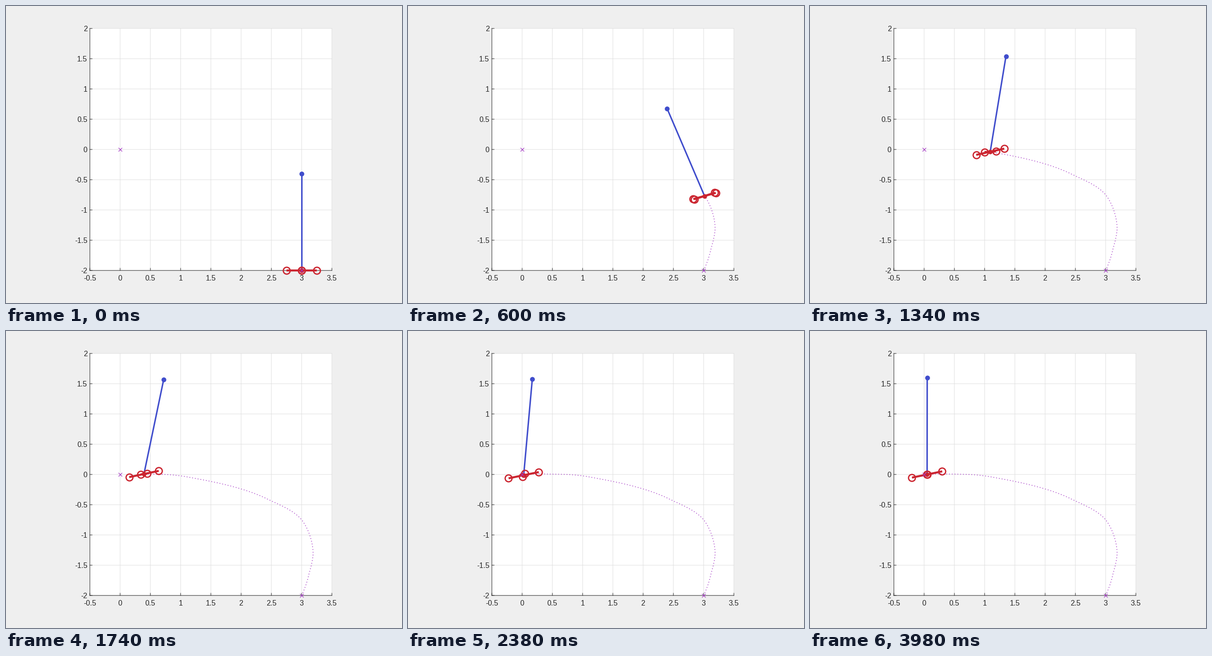
Animation of 864x648 px, one loop 4 s. Source, as a matplotlib script:

```python
import numpy as np
import matplotlib.pyplot as plt
from matplotlib.animation import FuncAnimation

W, H, DPI = 864, 648, 100
FRAMES, STEP = 200, 20
PX = 72 / DPI
UNIT, X0, Y0 = 132, 249, 313
ARM, ROD = 33, 211.5
BLUE, RED, PURPLE = "#404dcc", "#cb2530", "#a235c4"
INK, GRID = "#262626", "#dfdfdf"

plt.rcParams["font.family"] = "Liberation Sans"
fig = plt.figure(figsize=(W / DPI, H / DPI), dpi=DPI, facecolor="#efefef")
ax = fig.add_axes([0, 0, 1, 1])
ax.set(xlim=(0, W), ylim=(H, 0))
ax.axis("off")

t = np.arange(FRAMES) * STEP / 1000


def spline(keys, values):
    """Cubic through a few key values, starting at rest."""
    slope = np.gradient(values, keys)
    slope[0] = 0
    k = np.searchsorted(keys, t, side="right") - 1
    h = keys[k + 1] - keys[k]
    u = (t - keys[k]) / h
    rise = values[k + 1] - values[k]
    return (values[k] + u * u * (3 - 2 * u) * rise
            + u * (1 - u) * h * ((1 - u) * slope[k] - u * slope[k + 1]))


def pulse(peak, sharp):
    """Rises from 0 to 1 at the peak time, then dies away."""
    r = t / peak
    return r ** sharp * np.exp(sharp * (1 - r))


# Flight path of the body: time, x, y
keys = np.array([
    (0, 645, 577), (.25, 660, 534.5), (.4, 670, 483), (.6, 647, 414.5),
    (.85, 569, 366), (1.34, 393.2, 318), (1.74, 301, 312), (2.38, 252.4, 314.6),
    (2.7, 246.5, 315), (3, 250.2, 314), (4, 255.6, 313)])
x, y = (spline(keys[:, 0], col) for col in keys.T[1:])

# The pendulum lags behind, swings past the body and settles upright
lean = 47.6 * pulse(1.54, 8.4) - 86 * pulse(.55, 4)
depth = 40 * pulse(.6, 4) + 20 * pulse(2.05, 20)
tip_x = x + lean
tip_y = y - np.sqrt(ROD ** 2 - lean ** 2 - depth ** 2)

# Two crossed rotor arms: yaw shortens one and opens the other
yaw = np.radians(42) * pulse(.6, 1.5)
pitch = 6.8 * (1 - np.exp(-(t / .3) ** 3))
roll = 7 * pulse(.6, 6) + 3.5 * pulse(2.4, 30)
spans = [(ARM * np.cos(yaw), -pitch), (ARM * np.sin(yaw), -roll)]


def line(xs, ys, color, width, **kw):
    return ax.plot(xs, ys, color=color, lw=width * PX, **kw)[0]


def rule(xs, ys, color):
    line(xs, ys, color, 1, snap=False)


def label(px, py, value, ha):
    ax.text(px, py, f"{value:g}", ha=ha, va="baseline", size=16 * PX, color=INK)


left, right, top, bottom = 183, 711, 49, 577
ticks = [(left + 66 * n, bottom - 66 * n, n / 2) for n in range(9)]
ax.fill([left, right, right, left], [top, top, bottom, bottom], color="white", lw=0)
for gx, gy, _ in ticks:
    rule([gx, gx], [top, bottom], GRID)
    rule([left, right], [gy, gy], GRID)
for gx, gy, value in ticks:
    rule([gx, gx], [bottom, bottom - 5], INK)
    rule([left, left + 5], [gy, gy], INK)
    label(gx, 599, value - .5, "center")
    label(177.5, gy + 5.6, value - 2, "right")
rule([left, left], [top, bottom], INK)
rule([left, right], [bottom, bottom], INK)

trail = line([], [], PURPLE, 1.6, ls=(0, (1, 2.8)), dash_capstyle="butt")
rod = line([], [], BLUE, 3.2, solid_capstyle="butt")
tip = line([], [], BLUE, 0, marker="o", ms=10.5 * PX, mew=0)
hub = line([], [], RED, 0, marker="o", ms=10 * PX, mew=0)
arms = [line([], [], RED, 4.4, solid_capstyle="butt", marker="o", ms=15 * PX,
             mfc="none", mew=2.8 * PX) for _ in spans]
line([X0, X0 + 3 * UNIT], [Y0, Y0 + 2 * UNIT], PURPLE, 0, marker="x",
     ms=8 * PX, mew=1.2 * PX, zorder=4)


def update(i):
    trail.set_data(x[:i + 1], y[:i + 1])
    rod.set_data([x[i], tip_x[i]], [y[i], tip_y[i]])
    tip.set_data([tip_x[i]], [tip_y[i]])
    hub.set_data([x[i]], [y[i]])
    for arm, (dx, dy) in zip(arms, spans):
        arm.set_data([x[i] - dx[i], x[i] + dx[i]], [y[i] - dy[i], y[i] + dy[i]])
    return [trail, rod, tip, hub, *arms]


anim = FuncAnimation(fig, update, frames=FRAMES, interval=STEP, repeat=True,
                     repeat_delay=0, blit=False)
plt.show()
```
